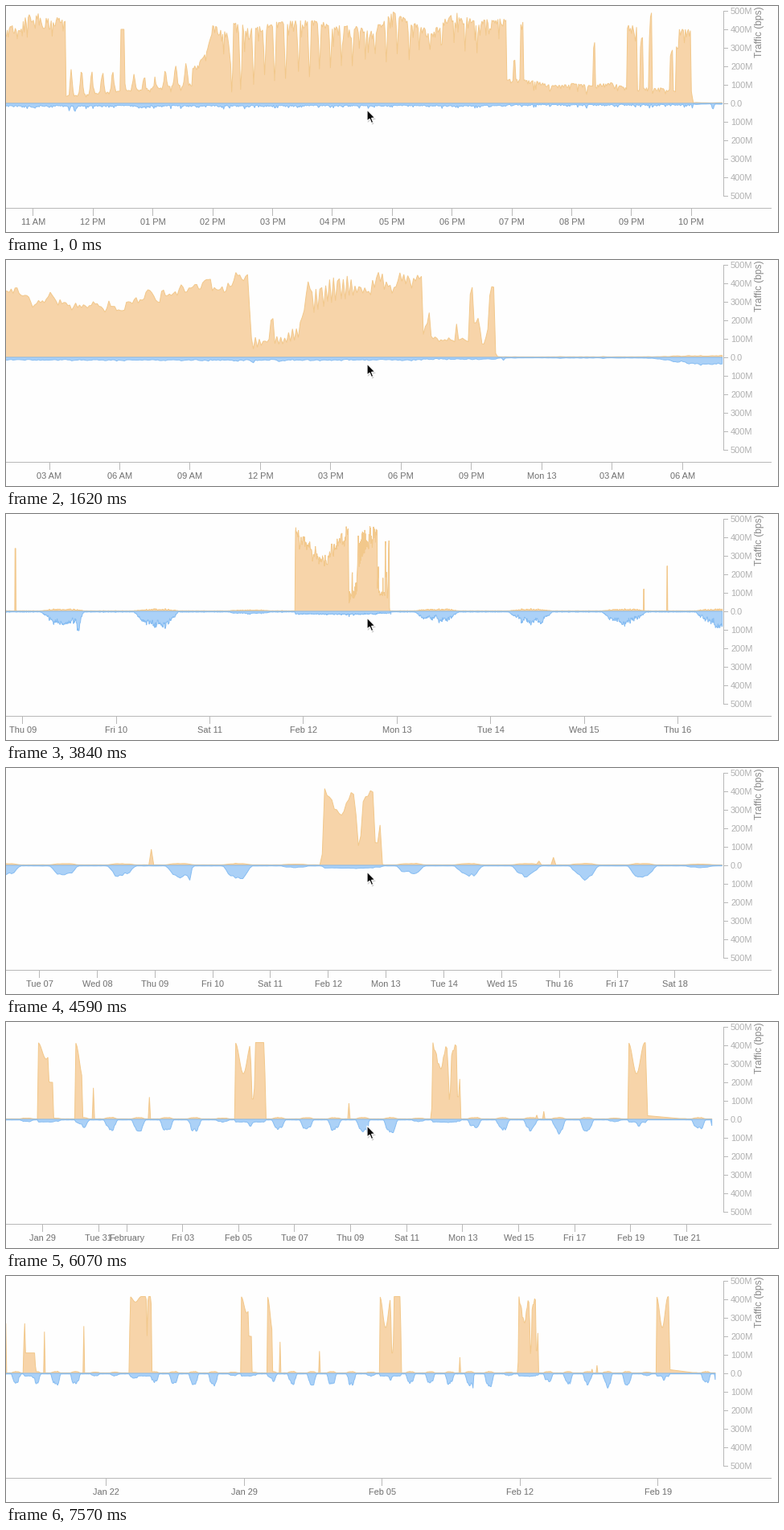
A matplotlib script that plays this animation: 960 px wide and 281 px high, repeating every 8.62 s.

```python
import numpy as np
import matplotlib.pyplot as plt
from matplotlib.animation import FuncAnimation
from matplotlib.collections import LineCollection
from matplotlib.patches import Polygon

W, H, DPI = 960, 281, 64
PX = 72 / DPI
LOOP, TICK = 8620, 20
RIGHT, ZERO, PER_M = 892, 121, 0.23

plt.rcParams.update({"font.family": "Liberation Sans", "path.snap": False})

# ---------- traffic, one sample per minute; hours count from Feb 12, 00:00
FIRST, N = -648, 53160
t = FIRST + np.arange(N) / 60
rng = np.random.default_rng(12)


def noise(minutes):
    """Smooth noise with one random knot per interval."""
    knots = rng.standard_normal(N // minutes + 2)
    return np.interp(np.arange(N) / minutes, np.arange(len(knots)), knots)


def span(start, hours):
    return (t >= start) & (t < start + hours)


def bell(center, width):
    return np.exp(-((t - center) / width) ** 2)


n5, n20, n60 = noise(5), noise(20), noise(60)
jitter = rng.exponential(1, N)

# weekday office hours, busier towards Friday
weekday = (t // 24) % 7
office = ~np.isin(weekday, (0, 6))
work = np.interp(t % 24 / 24, [.19, .29, .4, .54, .66], [0, .8, 1, 1, 0])
up = 2 + np.abs(n5) + (4 + 3 * office) * work * np.clip(.9 + .4 * n5, .2, 2)
down = 2.5 + 1.5 * np.abs(n5)
down += (9 + office * (28 + 5 * weekday)) * work * np.clip(.95 + .2 * n5 + .2 * n60, .3, 1.5)


def block(start, hours, sag, lull=0, lull_hours=0, level=110):
    """Heavy load that sags over its first 14 hours, with an optional quiet stretch."""
    m = span(start, hours)
    age = t[m] - start
    v = 415 - sag * np.sin(np.pi * np.clip(age / 14, 0, 1)) ** 2
    quiet = np.interp(age, [lull, lull + .03, lull + lull_hours, lull + lull_hours + .4],
                      [0, 1, 1, 0]) if lull_hours else 0
    up[m] = v + (level - v) * quiet
    down[m] = 9 + 2 * np.abs(n5[m]) + 4 * jitter[m] + .3 * (down[m] - 9).clip(0)


def burst(hour, minutes, height):
    i = round((hour - FIRST - minutes / 120) * 60 / minutes) * minutes
    up[i:i + minutes] = height


block(-604.4, 13.7, 0, .9, 13)
block(-475.6, 26.5, 30, 20.5, 1, 200)
block(-340, 13, 90, 9, 4, 200)
block(-308, 6, 200)
block(-171, 25.6, 170, 13.6, 3)
block(166, 15.5, 170)

# Feb 12: morning load, pulsing lull, busy afternoon, quiet evening with bursts
block(-2.14, 24.17, 130)
lull = span(11.54, 2.36)
pulse = np.cos(np.pi * (t - 11.806) / .175) ** 8
up[lull] = (35 + 30 * (t - 11.54) + 95 * pulse * (1 + .4 * n20))[lull].clip(30)
rise = span(13.65, .65)
up[rise] = np.interp(t[rise], [13.65, 13.9, 14, 14.3], [170, 250, 380, 340])
evening = span(18.9, 3.13)
up[evening] = (105 - 9 * (t - 18.9) + 8 * n20)[evening]
down[evening] -= 5
main = span(-2.14, 24.17)
up[main] *= (1.06 - .075 * jitter + .05 * n20 + .05 * n5 * (t < 11.54))[main]
for hour in np.arange(14.31, 18.85, .186):
    floor = 50 + 50 * (hour - 14.31) + rng.uniform(0, 110)
    i = int((hour - FIRST) * 60) + rng.integers(-1, 2)
    up[i - 1:i + 2] = np.minimum(up[i - 1:i + 2], [floor + 150, floor, floor + 110])

for event in [(12.5, 4, 400), (19.06, 2, 230), (19.17, 3, 435), (20.37, 2, 320),
              (20.96, 8, 410), (21.08, 3, 400), (21.16, 3, 360), (21.33, 3, 480),
              (21.67, 3, 280), (21.78, 3, 300), (21.93, 12, 390),
              (-626.4, 60, 270), (-579.6, 60, 225), (-531.4, 60, 255), (-292.6, 60, 170),
              (-244.3, 60, 120), (-74, 15, 340), (87.2, 10, 120), (93.2, 10, 245)]:
    burst(*event)
up[evening] *= (1.03 - .05 * jitter)[evening]

# Feb 19: a recording gap bridged by a straight line
gap = span(181.5, 34)
up[gap] = np.interp(t[gap], [181.5, 210], [20, 4])
down[gap] = 3
down += 10 * bell(15.05, .15) * jitter + 75 * bell(-57.7, .5) + 30 * bell(11.7, .02)
down += 30 * bell(22.36, .02) + 25 * (bell(-158, 1.5) + bell(175, 1.5))
down[-60:] = 35


def level(minutes):
    return [s.reshape(-1, minutes).mean(axis=1) for s in (t, up, down)]


FINE, MID, COARSE = level(1), level(5), level(60)

# ---------- zoom: pixels per hour over wheel steps
KEYS = np.array([0, 11, 19, 26, 35, 41, 45])
LOGS = np.log([74.4, 29.15, 11.23, 4.85, 2.164, 1.451, 1.021])
SLOPES = np.gradient(LOGS, KEYS)
STEPS = np.concatenate([np.linspace(*g) for g in [
    (150, 1170, 8), (1320, 2360, 8), (2500, 3540, 8), (3690, 4590, 7),
    (4740, 5780, 8), (5920, 6070, 2), (6520, 7420, 7)]])


def scale(k):
    """Cubic Hermite curve through the zoom keys."""
    k = min(k, KEYS[-1])
    i = max(np.searchsorted(KEYS, k) - 1, 0)
    d = KEYS[i + 1] - KEYS[i]
    u = (k - KEYS[i]) / d
    return np.exp(LOGS[i] * (1 + 2 * u) * (1 - u) ** 2 + LOGS[i + 1] * u * u * (3 - 2 * u)
                  + d * u * (1 - u) * (SLOPES[i] * (1 - u) - SLOPES[i + 1] * u))


def calendar(hour):
    d = hour // 24
    return ("Feb", 12 + d) if d > -12 else ("Jan", 43 + d)


def label(hour):
    if hour % 24:
        return f"{hour % 12 or 12:02d} {'AM' if hour % 24 < 12 else 'PM'}"
    month, date = calendar(hour)
    if date == 1:
        return "February"
    name = ("", "Mon", "Tue", "Wed", "Thu", "Fri", "Sat")[hour // 24 % 7] or month
    return f"{name} {date:02d}"


def ticks(lo, hi):
    target = (hi - lo) / 9
    step = min((1, 3, 6, 12, 24, 48, 168), key=lambda s: abs(np.log(target / s)))
    base = 24 if step == 48 else step
    hours = range(int((lo - target / 2) // base) * base, int(hi) + 1, base)
    if step == 48:  # odd dates, restarting each month
        hours = [h for h in hours if calendar(h)[1] % 2]
    return [h for h in hours if h <= hi]


# ---------- stage
fig = plt.figure(figsize=(W / DPI, H / DPI), dpi=DPI, facecolor="#fefefe")
ax = fig.add_axes([0, 0, 1, 1])
ax.set_xlim(0, W)
ax.set_ylim(H, 0)
ax.axis("off")


def area(fill, edge, z):
    return ax.add_patch(Polygon([(0, 0), (0, 1)], fc=fill, ec=edge, lw=PX,
                                joinstyle="bevel", zorder=z))


upper = area("#f7d4a9", "#f2c88b", 1)
lower = area("#abd1f7", "#87bdf2", 2)

AXIS = dict(color="#b9b9b9", lw=PX, solid_capstyle="butt", zorder=3)
ax.plot([892.5, 892.5], [6, 237], **AXIS)
ax.plot([0, 952], [251.5, 251.5], **AXIS)
for i in range(11):
    y = 6.5 + 23 * i
    ax.plot([892, 898], [y, y], **AXIS)
    text = f"{abs(5 - i)}00M" if i != 5 else "0.0"
    ax.text(901, y + 3.7, text, size=11 * PX, color="#b0b0b0")
ax.text(937, 32.5, "Traffic (bps)", size=12 * PX, color="#8a8a8a", rotation=90,
        ha="center", va="center")

marks = ax.add_collection(LineCollection([], colors="#b9b9b9", linewidths=PX, zorder=3))
names = [ax.text(0, 272, "", size=11 * PX, color="#707070", ha="center")
         for _ in range(24)]

ARROW = np.array([(0, 0), (0, 14.2), (3.2, 11.3), (5.4, 16.6), (7.8, 15.6),
                  (5.6, 10.4), (10, 10.2)])
shadow = ax.add_patch(Polygon(ARROW, fc="#000000", ec="none", alpha=.2, zorder=5))
cursor = ax.add_patch(Polygon(ARROW, fc="#0a0a0a", ec="white", lw=1.2 * PX, zorder=6))


def update(n):
    now = n * TICK + TICK / 2
    k = int(np.searchsorted(STEPS, now, side="right"))
    s = scale(k)
    end = min(16.6 + 441.5 / s, 247.35)

    def to_x(hour):
        return RIGHT + (hour - end) * s

    hours, a, b = FINE if s > 45 else MID if s > 3.4 else COARSE
    x = to_x(hours)
    i, j = np.searchsorted(x, [-6, 891])
    x = x[i:j]
    for patch, y in ((upper, ZERO - a[i:j] * PER_M), (lower, ZERO + b[i:j] * PER_M)):
        patch.set_xy(np.column_stack([np.r_[x[0], x, x[-1]], np.r_[ZERO, y, ZERO]]))

    shown = ticks(end - RIGHT / s, end)
    segs = []
    for idx, txt in enumerate(names):
        txt.set_visible(idx < len(shown))
        if idx < len(shown):
            cx = to_x(shown[idx])
            segs.append([(int(cx) + .5, 252), (int(cx) + .5, 261)])
            txt.set_x(cx)
            txt.set_text(label(shown[idx]))
    marks.set_segments(segs)

    tip = np.array([449, 129]) + np.array([210, 68]) * np.clip((k - 45) / 3, 0, 1)
    cursor.set_xy(ARROW + tip)
    shadow.set_xy(ARROW + tip + (.8, 1.8))
    for p in (cursor, shadow):
        p.set_visible(now < 7570)


anim = FuncAnimation(fig, update, frames=LOOP // TICK, interval=TICK, repeat=True,
                     repeat_delay=0, init_func=lambda: update(0))
plt.show()
```
